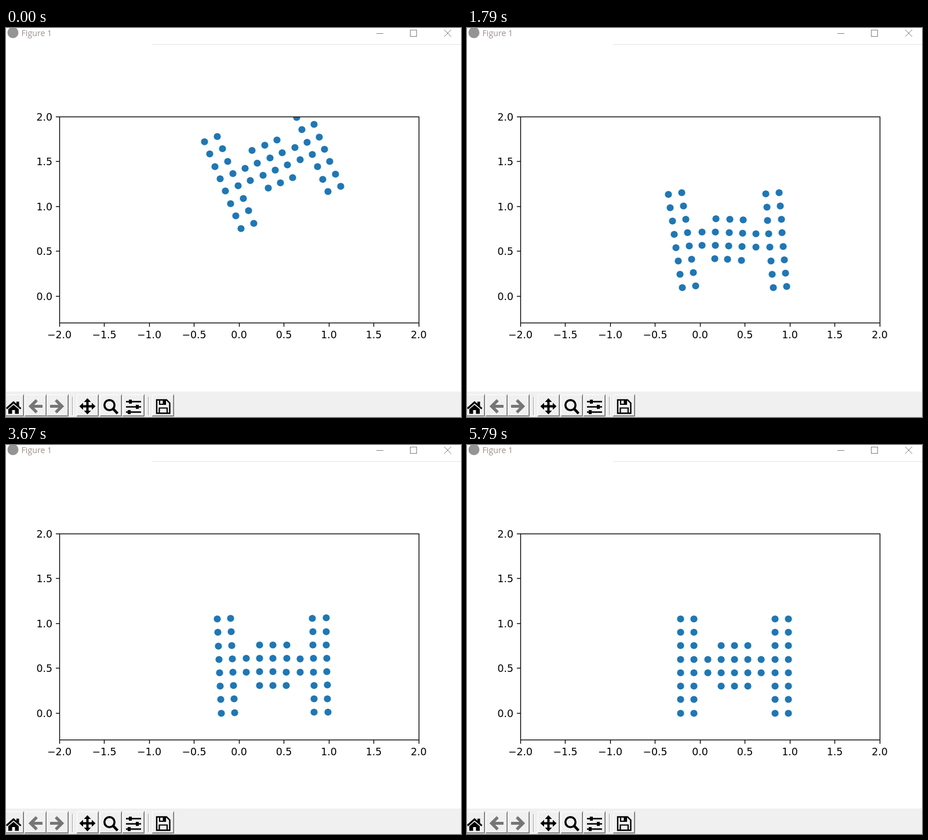
These frames come from a looping animation (785x672 px, 5940 ms). An HTML page:

```html
<!DOCTYPE html>
<html lang="en">
<head>
<meta charset="utf-8">
<title>Soft body drop</title>
<style>
html, body { margin: 0; width: 100%; height: 100%; overflow: hidden; background: #fff; }
svg { display: block; }
.tick { font: 17.36px "DejaVu Sans", sans-serif; }
.title { font: 14.2px "Open Sans", sans-serif; fill: #998f8a; }
</style>
</head>
<body>
<svg width="785" height="672" viewBox="0 0 785 672">
  <defs>
    <clipPath id="plot"><rect x="92" y="153" width="620" height="356"/></clipPath>
    <pattern id="stipple" width="2" height="2" patternUnits="userSpaceOnUse">
      <rect width="2" height="2" fill="#b4b4b4"/>
      <path d="M0 0h1v1h-1zM1 1h1v1h-1z" fill="#363636"/>
    </pattern>
  </defs>

  <!-- title bar -->
  <circle cx="12" cy="8" r="9.5" fill="#949494"/>
  <text class="title" x="26.5" y="14">Figure 1</text>
  <path d="M252 28.5H785" stroke="#e3e3e3"/>
  <g fill="none" stroke="#808080">
    <path d="M639 9.5h12M756 3l12 12M768 3l-12 12"/>
    <rect x="697.5" y="3.5" width="11" height="11"/>
  </g>

  <g id="dots" clip-path="url(#plot)" fill="#1f77b4"></g>
  <g id="axes" fill="none" stroke="#000" stroke-width="1.39">
    <rect x="92.5" y="153.5" width="620" height="356"/>
  </g>
  <g id="labels"></g>

  <!-- toolbar -->
  <rect y="628" width="785" height="44" fill="#f0f0f0"/>
  <g id="buttons" fill="none"></g>
  <path d="M114.5 637V669M245.5 637V669" stroke="#a0a0a0"/>
  <path d="M115.5 637V669M246.5 637V669" stroke="#fff"/>
  <path d="M0 656L13 644.5l5 4.500V645.500h4.500v7.500l4 3.500-1.800 2.200L13 648.800 1.800 658.700zM4 658.500l9-7.500 9 7.500v8h-6.500V660h-5v6.500H4z"/>
  <g fill="none" stroke="url(#stipple)" stroke-width="5">
    <path d="M63 653.500H43M53 643L42.500 653.500 53 664"/>
    <path d="M76 653.500H96M86 643L96.500 653.500 86 664"/>
  </g>
  <path d="M140.500 639.500l6 6.500h-4v5.500h5.500v-4l6.500 6-6.500 6v-4h-5.500v5.500h4l-6 6.500-6-6.500h4v-5.500H133v4l-6.500-6 6.500-6v4h5.500V646h-4z"/>
  <g fill="none" stroke="#000">
    <circle cx="178.500" cy="651.500" r="8.700" stroke-width="3.600"/>
    <path d="M185 658l7.500 8" stroke-width="4.500"/>
    <path d="M207 645.500h26M207 654.500h26M207 663.500h26" stroke-width="2.400"/>
    <path d="M214.500 642v7M226.500 651v7M212.500 660v7" stroke-width="5"/>
    <path d="M260 642.500h17l5.500 5.500v17.500H260z" stroke-width="2.400"/>
    <path d="M264.500 665v-8.500h13.500v8.500M265 643v7h10v-7" stroke-width="2.200"/>
  </g>
  <path d="M270.500 643h4v6h-4z"/>
</svg>

<script>
const $ = id => document.getElementById(id);

function add(parent, tag, attrs, text) {
  const el = document.createElementNS("http://www.w3.org/2000/svg", tag);
  for (const name in attrs) el.setAttribute(name, attrs[name]);
  if (text) el.textContent = text;
  parent.appendChild(el);
  return el;
}

// Axes
const label = v => v.toFixed(1).replace("-", "\u2212");
for (let n = 0; n <= 8; n++) {
  const x = 92 + n * 77.5;
  add($("axes"), "path", { d: `M${Math.floor(x) + 0.5} 510v6` });
  add($("labels"), "text", { class: "tick", x, y: 536, "text-anchor": "middle" }, label(n / 2 - 2));
}
for (let n = 0; n <= 4; n++) {
  const y = Math.floor(463 - n * 77.5);
  add($("axes"), "path", { d: `M92 ${y + 0.5}h-6` });
  add($("labels"), "text", { class: "tick", x: 80, y: y + 7, "text-anchor": "end" }, label(n / 2));
}

// Raised toolbar buttons
for (const x of [-7, 32, 70, 122, 162, 201, 252]) {
  const edge = (d, stroke) => add($("buttons"), "path", { d, stroke });
  edge(`M${x + 0.5} 671V633.5h37`, "#fff");
  edge(`M${x + 1} 669.5h35.5V635`, "#a0a0a0");
  edge(`M${x} 670.5h37.5V633`, "#696969");
}

// Body: two straight legs joined by a beam that bends between them
const GAP = 23.22, FLOOR = 463.05, STEP = 78.24, LOOP = 5940, LAST = 74;
const DROP = 117, HIT = 11.75, HOP_END = 28;

// Swing key points: step, beam tilt, left lean, right lean (radians)
const SWING = [
  [HIT, -0.4, -0.4, -0.4],
  [14, -0.22, -0.405, -0.338],
  [16, -0.04, -0.3, -0.16],
  [23, 0, -0.148, -0.08],
  [27, 0.12, 0.2, 0.155],
  [37, 0.056, 0.131, 0.047],
  [47, -0.006, -0.044, -0.019],
  [60, 0, 0, 0]
];

function hermite(a, b, m0, m1, u) {
  const d = b - a;
  return a + u * (m0 + u * (3 * d - 2 * m0 - m1 + u * (m0 + m1 - 2 * d)));
}

function slope(a, b, m0, m1, u) {
  const d = b - a;
  return m0 + u * (2 * (3 * d - 2 * m0 - m1) + 3 * u * (m0 + m1 - 2 * d));
}

// Smooth curve through the key points, at rest at both ends
function swingAt(k) {
  const end = SWING.length - 1;
  if (k <= HIT) return SWING[0];
  if (k >= SWING[end][0]) return SWING[end];
  const n = SWING.findIndex(key => key[0] > k) - 1;
  const p = SWING[n], q = SWING[n + 1], span = q[0] - p[0];
  const rate = (m, c) => {
    const a = SWING[m - 1], b = SWING[m + 1];
    return a && b ? (b[c] - a[c]) / (b[0] - a[0]) * span : 0;
  };
  return p.map((v, c) => hermite(v, q[c], rate(n, c), rate(n + 1, c), (k - p[0]) / span));
}

// Height of the lowest dot above the floor: the fall, then one hop
function clearance(k) {
  if (k < HIT) return Math.max(0, DROP - k * (7.95 + 0.16 * k));
  const u = (k - 16) / (HOP_END - 16);
  return Math.max(0, 60 * u * (1 - u));
}

// The body drifts left during the hop and slides back
function centreX(k) {
  const u = (Math.max(k, HIT) - HOP_END) / 8.2;
  return 461.5 - 11.5 * Math.exp(-u * u / 2);
}

function makeLeg(side, tilt, lean) {
  return {
    x: side * 3.5 * GAP * Math.cos(tilt),
    y: side * 3.5 * GAP * Math.sin(tilt),
    nx: Math.cos(lean), ny: Math.sin(lean)
  };
}

// Place of the dot in column i, row j, relative to the body's centre
function dotAt(left, right, i, j) {
  const up = (j - 3.5) * GAP;
  if (i < 2 || i > 6) {
    const leg = i < 2 ? left : right;
    const out = (i < 2 ? i - 0.5 : i - 7.5) * GAP;
    return [leg.x + leg.nx * out + leg.ny * up, leg.y + leg.ny * out - leg.nx * up];
  }
  const len = 7 * GAP, u = (i - 0.5) / 7;
  const xs = [left.x, right.x, left.nx * len, right.nx * len, u];
  const ys = [left.y, right.y, left.ny * len, right.ny * len, u];
  const dx = slope(...xs), dy = slope(...ys), rise = up / Math.hypot(dx, dy);
  return [hermite(...xs) + dy * rise, hermite(...ys) - dx * rise];
}

const dots = [];
for (let i = 0; i < 9; i++) {
  const low = i < 2 || i > 6 ? 0 : i === 2 || i === 6 ? 3 : 2;
  for (let j = low; j <= 7 - low; j++) {
    dots.push({ i, j, el: add($("dots"), "circle", { r: 6.08 }) });
  }
}

const snap = v => Math.floor(v) + 0.5;

function draw(time) {
  const k = Math.min(LAST, Math.floor((time % LOOP + 20) / STEP));
  const [, tilt, leanLeft, leanRight] = swingAt(k);
  const left = makeLeg(-1, tilt, leanLeft), right = makeLeg(1, tilt, leanRight);
  const spots = dots.map(({ i, j }) => dotAt(left, right, i, j));
  const lowest = Math.max(...spots.map(spot => spot[1]));
  const x0 = centreX(k), y0 = FLOOR - lowest - clearance(k);
  dots.forEach(({ el }, n) => {
    el.setAttribute("cx", snap(x0 + spots[n][0]));
    el.setAttribute("cy", snap(y0 + spots[n][1]));
  });
}

const began = performance.now();
function tick() {
  draw(performance.now() - began);
  requestAnimationFrame(tick);
}
tick();
</script>
</body>
</html>
```
